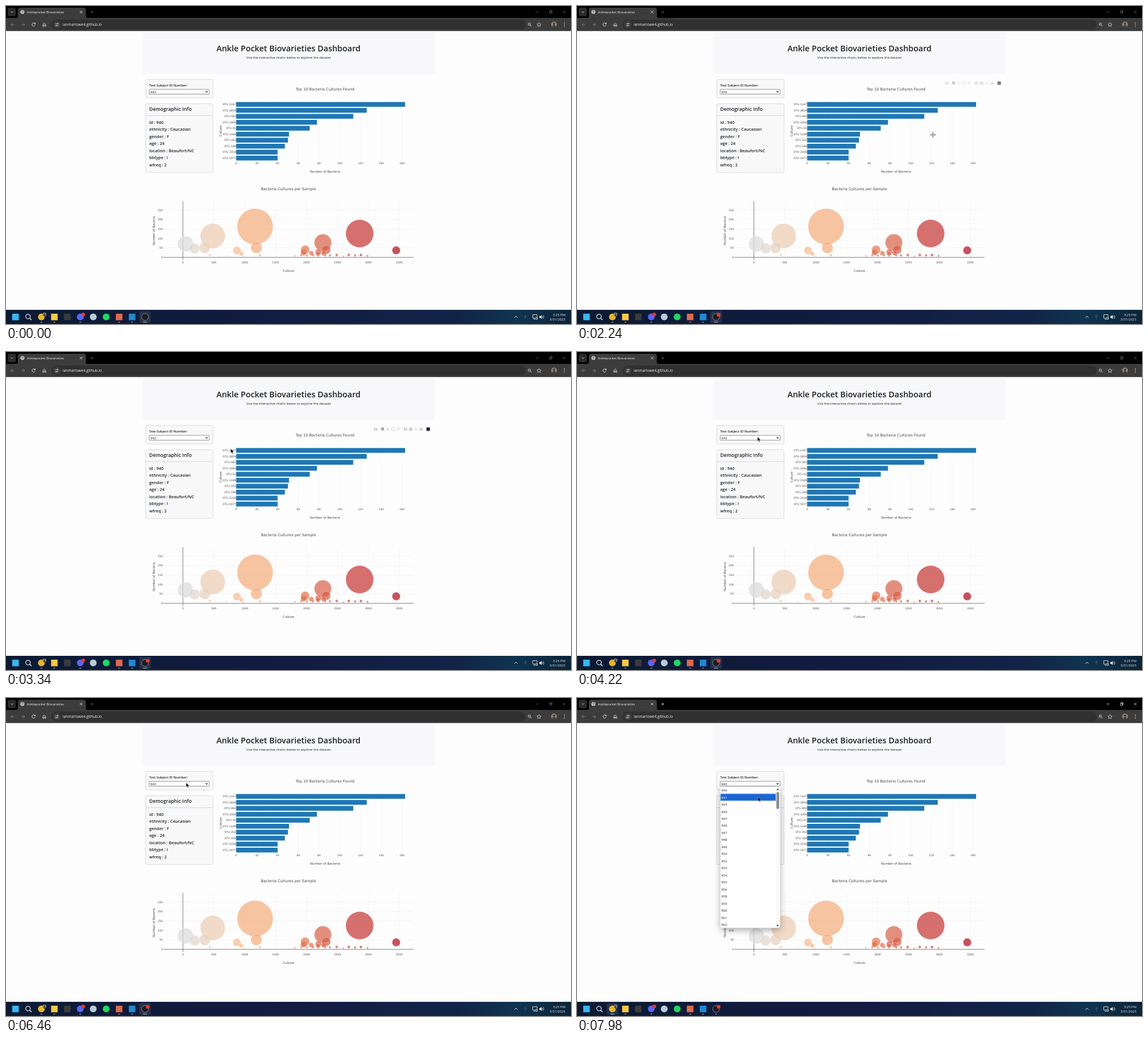
An HTML page for the animation above (8 s loop, 998x561 px).

```html
<!DOCTYPE html>
<html lang="en">
<head>
<meta charset="utf-8">
<title>Anklepocket Biovarieties</title>
<style>
html, body { margin: 0; width: 100%; height: 100%; overflow: hidden; background: #fdfdfd; }
svg { display: block; width: 100%; height: 100%; }
text { font-family: "Open Sans", "Noto Sans", sans-serif; font-size: 5.9px; fill: #1c2024; white-space: pre; }
.strong { font-weight: 600; }
.light { fill: #f0f0f0; }
.plot text { font-family: "DejaVu Sans", Verdana, sans-serif; font-size: 4.68px; fill: #444; }
.plot .title { font-size: 6.65px; }
.plot .axis { font-size: 5.45px; }
</style>
</head>
<body>
<svg id="stage" viewBox="0 0 998 561"></svg>
<script>
const LOOP = 8000, OPEN = 6620, HOVER = 7620;

const attrs = o => Object.entries(o).map(([k, v]) => ` ${k}="${v}"`).join('');
const rect = (x, y, width, height, fill, more = {}) =>
  `<rect${attrs({ x, y, width, height, fill, ...more })}/>`;
const circle = (cx, cy, r, fill, more = {}) => `<circle${attrs({ cx, cy, r, fill, ...more })}/>`;
const path = (d, stroke, width = .8, fill = 'none') =>
  `<path${attrs({ d, stroke, fill, 'stroke-width': width })}/>`;
const solid = (d, fill) => path(d, 'none', 0, fill);
const text = (x, y, str, more = {}) => `<text${attrs({ x, y, ...more })}>${str}</text>`;
const group = (body, more = {}) => `<g${attrs(more)}>${body}</g>`;
const at = (x, y, body) => group(body, { transform: `translate(${x} ${y})` });
const ring = (x, y, r, stroke, width = .8) => circle(x, y, r, 'none', { stroke, 'stroke-width': width });
const repeat = (n, fn) => Array.from({ length: n }, (_, i) => fn(i)).join('');
const mid = { 'text-anchor': 'middle' };
const end = { 'text-anchor': 'end' };
const size = px => ({ style: `font-size:${px}px` });

const avatar = (x, y, r) => at(x, y, circle(0, 0, r, '#8f8880') +
  circle(0, -r * .3, r * .38, '#4a3930') + circle(0, r * .6, r * .5, '#4a3930'));

function browser() {
  const pale = '#d8d8d8', grey = '#858585', cross = 'M-2.2-2.2l4.4 4.4M2.2-2.2l-4.4 4.4';
  const controls = (color, id) => group(
    at(151.6, 10.7, path('M-2.3 0h4.6M0-2.3v4.6', color)) +
    at(938, 10.6, path('M-2.4 0h4.8', color)) +
    at(962, 10.6, path('M-2.2-1.4h3.6v3.6h-3.6zM-1-1.4v-1h3.6v3.6h-1', color)) +
    at(986, 10.6, path(cross, color)), { id });
  const arrow = 'M3 0h-6M-.2-2.8l-2.8 2.8 2.8 2.8';
  return rect(0, 0, 998, 21.5, '#000') +
    rect(0, 21, 998, 23.2, '#3c3c3c') +
    rect(3, 3, 14.5, 15, '#2b2b2b', { rx: 4 }) +
    path('M8.5 9.7l2 2 2-2', '#ddd', 1) +
    solid('M17 21.5q4 0 4-4V7q0-4 4-4H137q4 0 4 4v10.5q0 4 4 4z', '#3c3c3c') +
    circle(29, 10.5, 3.6, '#c8c8c8') +
    path('M26.5 9l2.2 1.3.2 2.2M30 7.4l-.8 1.8 2.6 1.6', '#4a4a4a') +
    text(37, 12.8, 'Anklepocket Biovarieties', { ...size(5.75), class: 'light' }) +
    at(132.7, 10.6, path(cross, '#eee', .9)) +
    controls('#686868', 'idle') + controls('#f2f2f2', 'focus') +
    at(11.6, 32.8, path(arrow, grey, .9)) +
    at(30, 32.8, group(path(arrow, grey, .9), { transform: 'scale(-1)' })) +
    path('M51.3 31.2a2.9 2.9 0 1 0 .2 2.6M51.7 29.4v2.2h-2.2', pale, 1) +
    path('M65 32.3v3.5h1.8v-2.4h1.6v2.4h1.8v-3.5l-2.6-2.4z', pale, .9) +
    rect(80, 24, 838, 17.5, '#303030', { rx: 8.7 }) +
    circle(90, 32.8, 6.6, '#3c3c3c') +
    path('M86.8 31.2h3M91.8 31.2h1.4M86.8 34.6h1.2M90 34.6h3.2', pale) +
    ring(90.8, 31.2, 1, pale) + ring(88.9, 34.6, 1, pale) +
    text(100, 35.2, 'ianmarlowe4.github.io', { ...size(6.65), class: 'light' }) +
    ring(924.4, 32.1, 2.2, pale) + path('M926 33.7l2.3 2.3M923.4 32.1h2', pale) +
    path('M941.5 29.2l1.1 2.4 2.6.3-1.9 1.7.5 2.6-2.3-1.3-2.3 1.3.5-2.6-1.9-1.7 2.6-.3z', pale) +
    avatar(968, 32.5, 5) +
    repeat(3, i => circle(986.3, 29.9 + i * 2.9, .8, pale));
}

function panels() {
  const line = '#cfcfd6';
  const card = (y, h) => rect(246.8, y, 118.8, h, '#f8f8f9', { rx: 2.2, stroke: line, 'stroke-width': .7 });
  const strong = px => ({ ...size(px), class: 'strong' });
  const info = ['id : 940', 'ethnicity : Caucasian', 'gender : F', 'age : 24',
    'location : Beaufort/NC', 'bbtype : I', 'wfreq : 2'];
  return rect(241, 46, 516, 74, '#f8f8fa') +
    text(499, 79.6, 'Ankle Pocket Biovarieties Dashboard', { ...mid, ...strong(14.4) }) +
    text(499, 93, 'Use the interactive charts below to explore the dataset', mid) +
    card(129.6, 32.6) +
    text(253, 142.3, 'Test Subject ID Number:', strong(5.85)) +
    rect(253, 147.1, 106, 8.4, '#fff', { rx: .8, stroke: '#666', 'stroke-width': .7 }) +
    text(255, 153.5, '940') +
    path('M352.4 150.4l1.9 1.9 1.9-1.9', '#222', 1.1) +
    card(172.4, 121.2) +
    path('M247 193.4h118.4', line) +
    text(253, 184.6, 'Demographic Info', strong(8.7)) +
    info.map((s, i) => text(253, 207.7 + i * 12.48, s, strong(7.4))).join('');
}

// Culture id and count, largest first; the bars show the first ten.
const cultures = [[1167, 163], [2859, 126], [482, 113], [2264, 78], [41, 71], [1189, 51],
  [352, 50], [189, 47], [2318, 40], [1977, 40], [3450, 37], [874, 36], [1959, 30], [2191, 28],
  [1950, 25], [2077, 22], [2275, 22], [944, 19], [2184, 19]];

// The remaining small cultures: a few low ids, most of them past 2000.
function smallCultures() {
  let seed = 7;
  const random = () => (seed = seed * 16807 % 2147483647) / 2147483647;
  return Array.from({ length: 18 }, (_, i) => {
    const id = i < 5 ? 165 + i * 270 : 1795 + (i - 5) * 97 + random() * 30;
    return [id, 5 + random() * 8];
  });
}

const grid = d => path(d, '#eee', .6);

function barChart() {
  const x = v => 406.5 + v * 1.831;
  return text(563.5, 149, 'Top 10 Bacteria Cultures Found', { ...mid, class: 'title' }) +
    repeat(9, i => grid(`M${x(i * 20)} 168V273.5`) + text(x(i * 20), 278.6, i * 20, mid)) +
    cultures.slice(0, 10).map(([id, n], i) => {
      const y = 173.6 + i * 10.52;
      return rect(406.5, y - 4.2, x(n) - 406.5, 8.4, '#1f77b4') + text(406, y + 1.6, 'OTU ' + id, end);
    }).join('') +
    text(563.5, 294, 'Number of Bacteria', { ...mid, class: 'axis' }) +
    text(0, 0, 'Culture', { ...mid, class: 'axis', transform: 'translate(381 220.5) rotate(-90)' });
}

function shade(id) {
  const stops = [[0, 220, 220, 220], [.2, 245, 195, 157], [.4, 245, 160, 105], [1, 178, 10, 28]];
  const t = (id - 41) / 3409;
  const i = t <= .2 ? 0 : t <= .4 ? 1 : 2;
  const [a, b] = [stops[i], stops[i + 1]];
  const k = (t - a[0]) / (b[0] - a[0]);
  return `rgb(${[1, 2, 3].map(c => Math.round(a[c] + (b[c] - a[c]) * k))})`;
}

function bubbleChart() {
  const x = v => 312.5 + v * .1092, y = v => 443.4 - v * .3335;
  return text(499, 324.7, 'Bacteria Cultures per Sample', { ...mid, class: 'title' }) +
    repeat(8, i => grid(`M${x(i * 500)} 344V448`) + text(x(i * 500), 454.2, i * 500, mid)) +
    repeat(6, i => grid(`M280 ${y(i * 50)}H720`) + text(277, y(i * 50) + 1.6, i * 50, end)) +
    path('M312.5 344V448M278 443.4H720', '#555', .7) +
    [...cultures, ...smallCultures()].map(([id, n]) =>
      circle(x(id), y(n), n * .195, shade(id), { opacity: .7, stroke: '#fff', 'stroke-width': .4 })).join('') +
    text(499, 469.4, 'Culture', { ...mid, class: 'axis' }) +
    text(0, 0, 'Number of Baceria', { ...mid, class: 'axis', transform: 'translate(263.3 396.5) rotate(-90)' });
}

function modebar() {
  const c = '#c3c3c3';
  const box = rect(-2.8, -2.6, 5.6, 5.2, c);
  const groups = [
    [rect(-3, -2, 6, 4.2, c, { rx: .7 }) + circle(0, .2, 1.1, '#fff')],
    [ring(-.3, -.6, 2, '#777', 1.1) + path('M1.2 1l1.8 1.8M-1.2-.6h1.8', '#777'),
      path('M-3 0h6M0-3v6', c),
      `<rect x="-2.6" y="-2.6" width="5.2" height="5.2" fill="none" stroke="${c}" stroke-dasharray="1.3 .6"/>`,
      path('M-1.8 1q-2-3.4 2-3.6q4 .2 1.6 3q-1.6 1.2-3.6.6l.4 1.8', c)],
    [box + path('M-1.6 0h3.2M0-1.6v3.2', '#fff'),
      box + path('M-1.6 0h3.2', '#fff'),
      path('M-2.7-2.6l5.4 5.2M2.7-2.6l-5.4 5.2', c),
      solid('M-3.3.2l3.3-3 3.3 3h-1v2.4H.7V1H-.7v1.6h-1.6V.2z', c)],
    [rect(-3.1, -3.1, 6.2, 6.2, '#23263a', { rx: .8 })]
  ];
  let x = 653;
  return groups.map(icons => {
    const body = icons.map((icon, i) => at(x + i * 9.3, 136.2, icon)).join('');
    x += icons.length * 9.3 + 3;
    return body;
  }).join('');
}

function dropdown() {
  const skipped = [942, 951, 957];
  const ids = Array.from({ length: 23 }, (_, i) => 940 + i).filter(id => !skipped.includes(id));
  return `<path d="M253.4 156.4h105.2v246q0 3-3 3h-99.2q-3 0-3-3z" fill="#fff" style="filter:drop-shadow(0 4px 6px rgba(0,0,0,.32))"/>` +
    rect(253.6, 156.5, 97.4, 12.2, '#1967d2', { id: 'mark' }) +
    ids.map((id, i) => text(255, 165.1 + i * 12.47, id, { id: 'row' + i })).join('') +
    rect(351, 156.5, 7.4, 246, '#fafafa') +
    rect(352.2, 166, 4.8, 30, '#8b8b8b', { rx: 2.4 }) +
    solid('M352 162.8h5l-2.5-3.8zM352 400h5l-2.5 3.6z', '#777');
}

function taskbar() {
  const slot = i => 16.8 + i * 22.88;
  const line = (i, w, fill) => rect(slot(i) - w / 2, 556.9, w, 1.3, fill, { rx: .6 });
  const tile = (i, color) => rect(slot(i) - 10, 538.5, 20, 20, '#fff', { rx: 2, opacity: .1 }) + line(i, 7.5, color);
  const red = (x, y) => circle(x, y, 3.3, '#e8382f');
  const square = color => rect(-5.8, -5.8, 11.6, 11.6, color);
  const disc = color => circle(0, 0, 6, color);
  const grey = '#9aa7b4', pale = '#e4e8ee';
  const icons = [square('#38b6f1'), ring(-.8, -.8, 4, pale, 1.3) + path('M2.2 2.2l3.2 3.2', pale, 1.5),
    disc('#e4b52c') + avatar(5.4, -4.6, 3.3), square('#f6c945'), square('#3b3b3b'),
    disc('#5865f2') + red(5.2, -4.4), disc('#b9cbd9'), disc('#1ed760'),
    square('#dd6a4c'), square('#1f8ad2'), disc('#1b1b1f') + ring(0, 0, 6, '#a9adb3', .7)];
  return rect(0, 536, 998, 25, 'url(#bar)') +
    group(tile(10, grey), { id: 'taskIdle' }) +
    group(tile(2, '#6fb7ea') + line(10, 3.4, grey), { id: 'taskFocus' }) +
    [2, 3, 5, 8, 9].map(i => line(i, 3.4, grey)).join('') +
    icons.map((icon, i) => at(slot(i), 548.6, icon)).join('') +
    group(red(250.2, 544.8), { id: 'record' }) +
    path('M898.2 549.8l2.6-2.6 2.6 2.6', '#eee', 1) +
    rect(916.2, 544.6, 2.4, 5, '#3d5068', { rx: 1.2 }) +
    path('M914.9 548.2q2.5 4.6 5 0M917.4 550.6v2', '#3d5068') +
    path('M938 548v-3.4h-7.6v6h4.6M932 552.6h3M936 549.2h2.6v3.4h-2.6z', '#eee', .9) +
    solid('M942.2 547h1.8l2.2-2v7.2l-2.2-2h-1.8z', '#eee') +
    path('M947.4 546.8q1.2 1.8 0 3.6M949 545.4q2.2 3.2 0 6.4', '#ddd') +
    text(988, 547, '3:25 PM', { ...end, class: 'light' }) +
    text(988, 555.3, '3/31/2025', { ...end, class: 'light' });
}

const pointer = group(
  group(path('M0 0v7.6l1.8-1.6 1.3 3 1.3-.6-1.3-2.9h2.5z', '#fff', .4, '#000'), { id: 'arrow' }) +
  group(path('M-5 0H5M0-5V5', '#666', 1.8) + path('M-4.6 0H4.6M0-4.6V4.6', '#d5d5d5'), { id: 'cross' }),
  { id: 'pointer' });

document.getElementById('stage').innerHTML =
  `<defs><linearGradient id="bar"><stop offset="0" stop-color="#0c1a33"/><stop offset=".5" stop-color="#131c42"/>
  <stop offset=".8" stop-color="#112447"/><stop offset=".9" stop-color="#103450"/><stop offset="1" stop-color="#0c2438"/></linearGradient></defs>` +
  rect(0, 0, 998, 561, '#fdfdfd') + panels() +
  group(barChart() + bubbleChart(), { class: 'plot' }) +
  group(modebar(), { id: 'modebar' }) + browser() +
  group(dropdown(), { id: 'list' }) + taskbar() + pointer;

// Steps are [ms, value, easing to the next]; the first and last values hold to the ends.
function play(id, prop, steps, ease = 'linear') {
  const all = [[0, steps[0][1]], ...steps, [LOOP, steps[steps.length - 1][1]]];
  const frames = all.map(([t, v, easing = ease]) => ({ offset: t / LOOP, [prop]: v, easing }));
  const move = document.getElementById(id).animate(frames, { duration: LOOP, iterations: Infinity });
  move.startTime = 0;
}
const jump = (id, prop, ...steps) => play(id, prop, steps, 'steps(1, end)');
const show = (id, from, to = LOOP) => jump(id, 'opacity', [0, 0], [from, 1], [to, to < LOOP ? 0 : 1]);
const hide = (id, from) => jump(id, 'opacity', [0, 1], [from, 0]);

const spot = (x, y) => `translate(${x}px, ${y}px)`;
play('pointer', 'transform', [
  [1980, spot(980, 305), 'cubic-bezier(.2, .6, .4, 1)'], [2660, spot(519, 203)],
  [2800, spot(518, 203), 'ease-in-out'], [3760, spot(319, 149.8)],
  [7280, spot(318, 149.4), 'ease-in-out'], [7960, spot(319.8, 174.6)]
]);
jump('arrow', 'opacity', [0, 0], [1980, 1], [2160, 0], [3310, 1]);
show('cross', 2160, 3310);
play('modebar', 'opacity', [[2140, 0, 'ease'], [2440, 1], [3440, 1, 'ease'], [3740, 0]]);

show('record', 620);
for (const id of ['focus', 'taskFocus', 'list']) show(id, OPEN);
for (const id of ['idle', 'taskIdle']) hide(id, OPEN);

jump('mark', 'transform', [0, spot(0, 0)], [HOVER, spot(0, 12.47)]);
jump('row0', 'fill', [0, '#fff'], [HOVER, '#1c2024']);
jump('row1', 'fill', [0, '#1c2024'], [HOVER, '#fff']);
</script>
</body>
</html>
```
